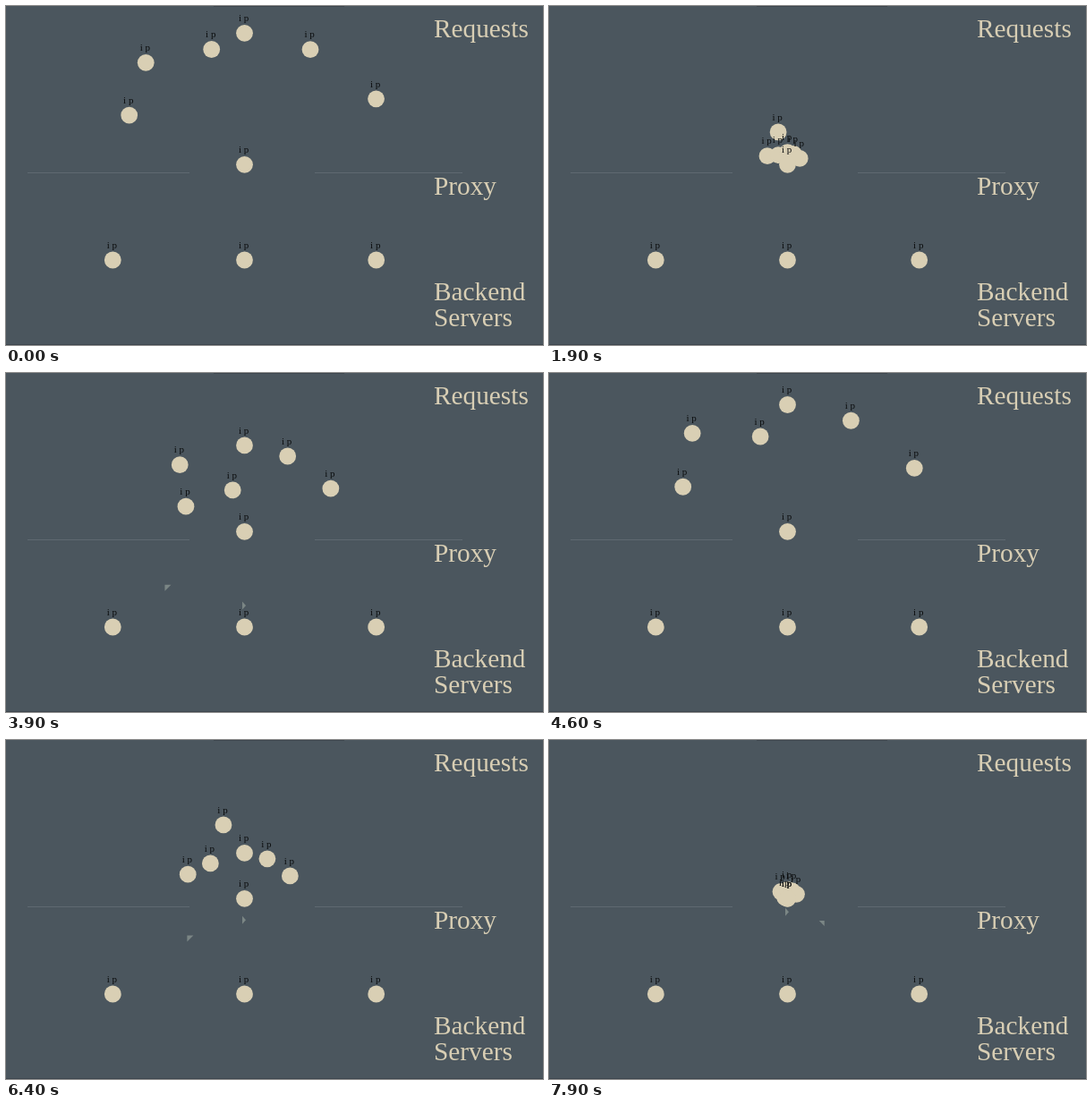
An HTML page that plays this animation: 600x379 px, repeating every 8000 ms.

```html
<!DOCTYPE html>
<html lang="en">
<head>
<meta charset="utf-8">
<title>Proxy and backend servers</title>
<style>
  html, body { margin: 0; width: 100%; height: 100%; overflow: hidden; background: #4b565e; }
  svg { display: block; width: 100%; height: 100%; }
  text { font-family: "Liberation Serif", "Times New Roman", serif; }
  .title { font-size: 29.3px; fill: #d8ceb4; }
  .label { font-size: 11px; fill: #0b0d0e; }
  .dot { fill: #d9cfb4; }
  .packet { fill: #87928f; }
</style>
</head>
<body>
<svg viewBox="0 0 600 379">
  <rect width="600" height="379" fill="#4b565e"/>
  <path d="M232 .5H378M0 378.5H600" stroke="#3d464d" stroke-width="1"/>
  <path d="M24 186.5H205M345 186.5H510" stroke="#68727a" stroke-width="1" opacity=".7"/>
  <g class="title">
    <text x="478" y="35">Requests</text>
    <text x="478" y="211">Proxy</text>
    <text x="478" y="329">Backend</text>
    <text x="478" y="358">Servers</text>
  </g>
  <g id="packets"></g>
  <g id="dots"></g>
  <g id="labels"></g>
</svg>
<script>
const LOOP = 8000, HALF = 2500, LEAD = 60;
const UNIT = 18.4;
const proxy = { x: 266.5, y: 177.3 };

function add(parentId, tag, attrs) {
  const el = document.createElementNS("http://www.w3.org/2000/svg", tag);
  for (const key in attrs) el.setAttribute(key, attrs[key]);
  return document.getElementById(parentId).appendChild(el);
}

function makeNode() {
  const dot = add("dots", "circle", { r: 9.4, class: "dot" });
  const label = add("labels", "text", { class: "label" });
  label.textContent = "i p";
  return (x, y) => {
    dot.setAttribute("cx", x);
    dot.setAttribute("cy", y);
    label.setAttribute("x", x - 6.6);
    label.setAttribute("y", y - 13.2);
  };
}

const easeInOut = x => x < 0.5 ? 2 * x * x : 1 - 2 * (1 - x) ** 2;

// Distance from the proxy: 1 at the far end, 0 at the proxy, back and forth.
function distance(time) {
  const phase = (time / HALF) % 2;
  return 1 - easeInOut(phase < 1 ? phase : 2 - phase);
}

// Offsets from the proxy in grid units, with a start delay in ms.
const requests = [
  { dx: -7, dy: -3, delay: 200 },
  { dx: -6, dy: -6.2, delay: 0 },
  { dx: -2, dy: -7, delay: 400 },
  { dx: 0, dy: -8, delay: 0 },
  { dx: 4, dy: -7, delay: 0 },
  { dx: 8, dy: -4, delay: 0 }
].map(r => ({ ...r, place: makeNode() }));

const servers = [-8, 0, 8].map(dx => ({ x: proxy.x + dx * UNIT, y: 284 }));
for (const node of [proxy, ...servers]) makeNode()(node.x, node.y);

// Faint glints between the proxy and each server.
const packets = [
  { shape: "M-3 -3H4L-3 4Z", lead: -40, near: 0.2, far: 0.8, from: HALF },
  { shape: "M-2.5 -4.5L1.5 0L-2.5 4.5Z", lead: 260, near: 0.1, far: 0.88, from: 0 },
  { shape: "M-3 -3H3V3Z", lead: 500, near: 0.2, far: 0.82, from: 0 }
].map((p, i) => ({
  ...p,
  server: servers[i],
  el: add("packets", "path", { d: p.shape, class: "packet" })
}));

function draw(t) {
  for (const r of requests) {
    const d = distance(Math.max(0, t + LEAD - r.delay)) * UNIT;
    r.place(proxy.x + r.dx * d, proxy.y + r.dy * d);
  }
  for (const p of packets) {
    const d = distance(t + p.lead + 2 * HALF);
    const x = proxy.x + (p.server.x - proxy.x) * d;
    const y = proxy.y + (p.server.y - proxy.y) * d;
    const visible = t >= p.from && d > p.near && d < p.far;
    p.el.setAttribute("transform", `translate(${x} ${y})`);
    p.el.setAttribute("opacity", visible ? 0.8 : 0);
  }
}

const start = performance.now();
function frame() {
  draw((performance.now() - start) % LOOP);
  requestAnimationFrame(frame);
}
frame();
</script>
</body>
</html>
```
